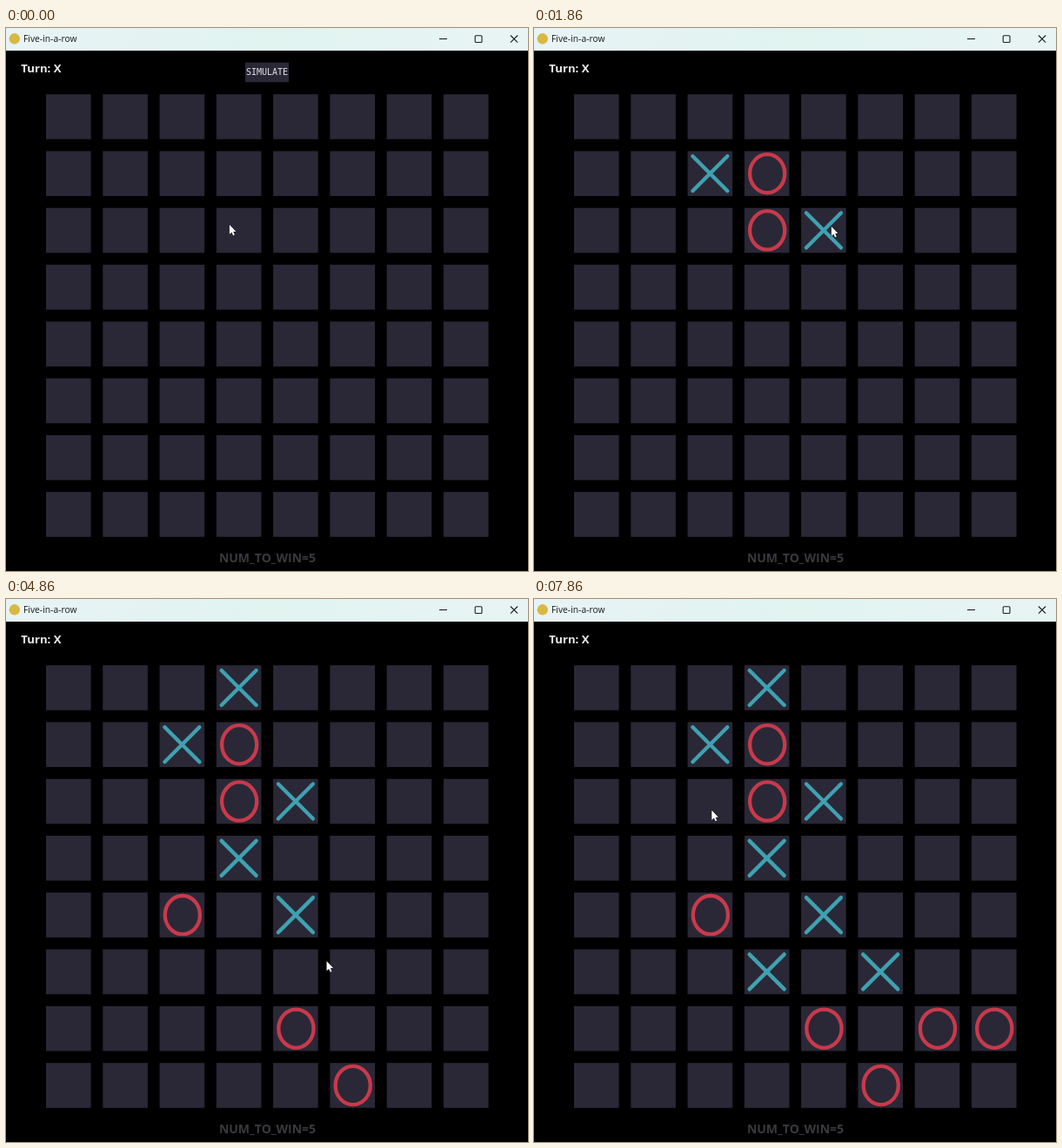
Animation of 600x624 px, one loop 8 s. Source, as an HTML page with a canvas:

```html
<!DOCTYPE html>
<html lang="en">
<head>
<meta charset="utf-8">
<title>Five-in-a-row</title>
<style>
  html, body { margin: 0; width: 100%; height: 100%; overflow: hidden; background: #000; }
  canvas { display: block; }
</style>
</head>
<body>
<canvas width="600" height="624"></canvas>
<script>
const ctx = document.querySelector('canvas').getContext('2d');
const LOOP = 8000, FPS = 7;
const PITCH = 65.28, LEFT = 46, TOP = 76.2, CELL = 51.6;
const FIRST_CLICK = 1.8, ROUND = 6.8;   // in ticks
const SLATE = '#2a2837';

// The pointer enters, clicks one cell per round, rests, then wanders off.
const entry = [337, 313];
const clicks = [[206, 170], [346, 223], [256, 309], [265, 103], [329, 389], [393, 432], [246, 421]];
const path = [entry, ...clicks, clicks[6], [204, 242]];
// Column and row of the O that answers each click.
const replies = [[3, 1], [3, 2], [2, 4], [4, 6], [5, 7], [6, 6], [7, 6]];

const clickTick = round => Math.round(FIRST_CLICK + ROUND * round);

function smoothstep(from, to, value) {
  const u = Math.min(1, Math.max(0, (value - from) / (to - from)));
  return u * u * (3 - 2 * u);
}

// The pointer lingers on each stop, then glides quickly to the next.
function pointerAt(tick) {
  const progress = (tick - FIRST_CLICK) / ROUND + 1;
  const stop = Math.floor(progress);
  const [from, to] = path.slice(stop, stop + 2);
  const k = smoothstep(0.62, 0.82, progress - stop);
  return from.map((v, axis) => v + (to[axis] - v) * k);
}

const cellAt = (x, y) => [Math.floor((x - LEFT) / PITCH), Math.floor((y - TOP) / PITCH)];
const cellCenter = (col, row) => [LEFT + col * PITCH + CELL / 2, TOP + row * PITCH + CELL / 2];

function rect(x, y, w, h, fill) {
  ctx.fillStyle = fill;
  ctx.fillRect(x, y, w, h);
}

function text(str, x, y, font, color, align = 'left') {
  ctx.font = font;
  ctx.fillStyle = color;
  ctx.textAlign = align;
  ctx.fillText(str, x, y);
}

function stroke(color, width, path) {
  ctx.strokeStyle = color;
  ctx.lineWidth = width;
  ctx.stroke(path);
}

function cross(x, y, r) {
  return new Path2D(`M${x - r} ${y - r}l${2 * r} ${2 * r}m0 ${-2 * r}l${-2 * r} ${2 * r}`);
}

function drawTitleBar() {
  const fill = ctx.createLinearGradient(0, 0, 600, 0);
  fill.addColorStop(0, '#e8f3f5');
  fill.addColorStop(0.5, '#e1f4f0');
  fill.addColorStop(1, '#e8f4f4');
  rect(0, 0, 600, 26, fill);
  ctx.fillStyle = '#d9b945';
  ctx.beginPath();
  ctx.arc(9.8, 12.3, 6.2, 0, 7);
  ctx.fill();
  text('Five-in-a-row', 20, 16.3, '10.3px "Open Sans", sans-serif', '#161a1a');
  const box = new Path2D();
  box.roundRect(539.2, 8.7, 7.8, 7.8, 1);
  for (const icon of [new Path2D('M498 12.5h9'), box, cross(584, 12.6, 4.1)])
    stroke('#1b2020', 1.1, icon);
}

function drawBoard() {
  for (let i = 0; i < 64; i++)
    rect(LEFT + (i % 8) * PITCH, TOP + Math.floor(i / 8) * PITCH, CELL, CELL, SLATE);
}

function drawX(col, row) {
  stroke('#3fa1b1', 4.4, cross(...cellCenter(col, row), 20));
}

function drawO(col, row) {
  const [x, y] = cellCenter(col, row), ring = new Path2D();
  ring.ellipse(x + 0.5, y, 20.1, 22.1, 0, 0, 7);
  stroke('#c83a4b', 4.3, ring);
}

const arrow = new Path2D('M0 0V11.8L2.7 9.3 4.5 13.3 6.3 12.5 4.6 8.6 8 8.4Z');

function drawPointer(x, y) {
  ctx.save();
  ctx.translate(x + 0.3, y + 0.8);
  ctx.scale(0.94, 0.94);
  stroke('#15141c', 1, arrow);
  ctx.fillStyle = '#fff';
  ctx.fill(arrow);
  ctx.restore();
}

function draw(ms) {
  const tick = Math.floor((ms % LOOP + 4) * FPS / 1000);
  rect(0, 0, 600, 624, '#000');
  ctx.lineCap = 'butt';
  drawTitleBar();
  text('Turn: X', 17.3, 51, 'bold 13.2px "Open Sans", sans-serif', '#ececec');
  text('NUM_TO_WIN=5', 300.5, 614, 'bold 14px "Open Sans", sans-serif', '#3b393f', 'center');
  if (tick < clickTick(0)) {
    rect(275, 39.6, 50, 22.6, SLATE);
    text('SIMULATE', 300, 53.6, '10px "DejaVu Sans Mono", monospace', '#e2e2e2', 'center');
  }
  drawBoard();
  ctx.lineCap = 'round';
  clicks.forEach((point, round) => {
    if (tick >= clickTick(round)) drawX(...cellAt(...point));
    if (tick > clickTick(round)) drawO(...replies[round]);
  });
  drawPointer(...pointerAt(Math.min(tick, LOOP * FPS / 1000 - 1)));
}

function loop() {
  draw(performance.now());
  requestAnimationFrame(loop);
}
loop();
</script>
</body>
</html>
```
